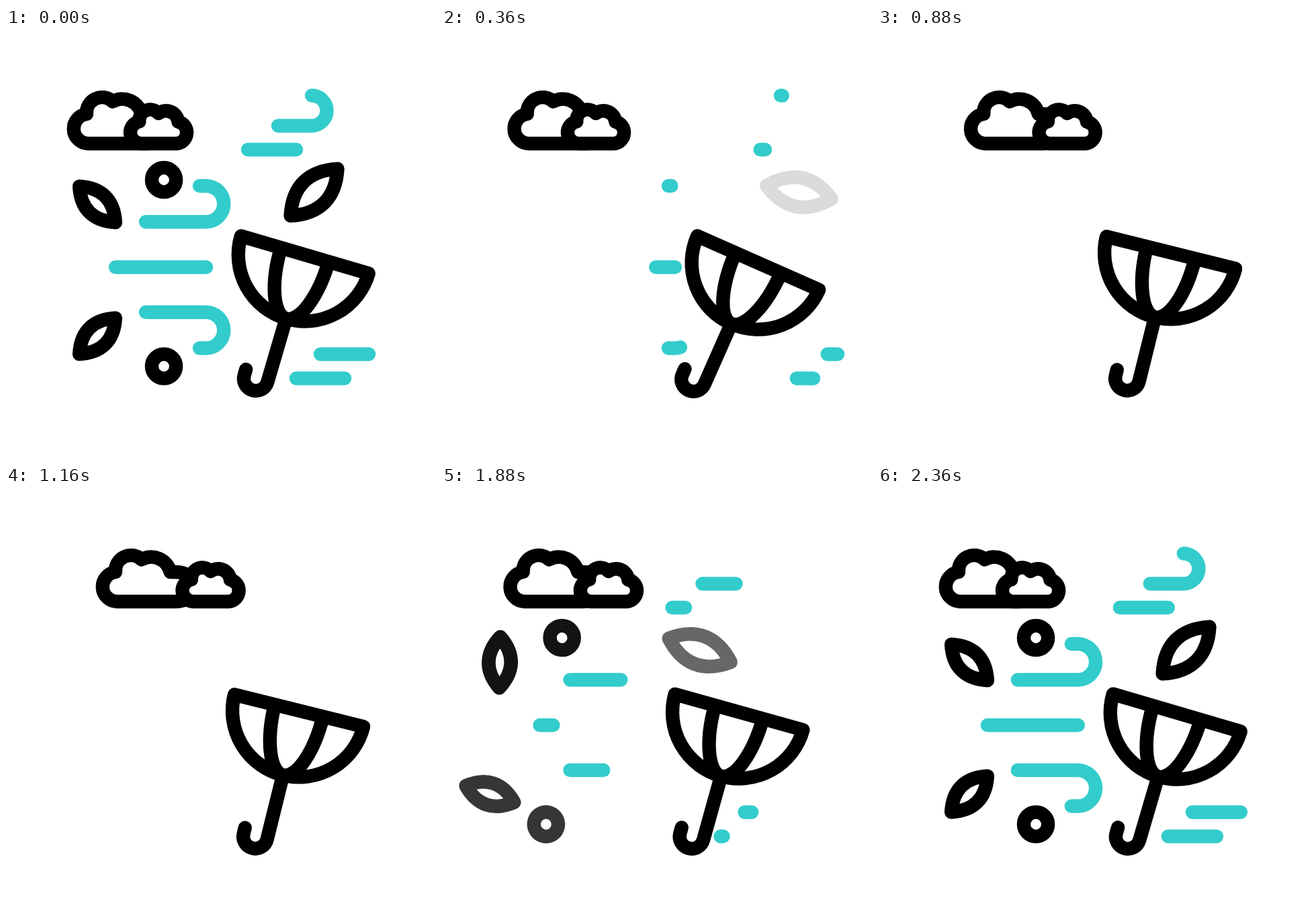
Recreate the animation shown at these times as an HTML page with a canvas. Size 640 by 640 pixels, loop 2.4 s.

```html
<!DOCTYPE html>
<html lang="en">
<head>
<meta charset="utf-8">
<title>Windy weather</title>
<style>
  html, body { margin: 0; width: 100%; height: 100%; overflow: hidden; background: #fff; }
  canvas { display: block; width: 640px; height: 640px; }
</style>
</head>
<body>
<canvas id="stage" width="640" height="640"></canvas>
<script>
const ctx = document.getElementById('stage').getContext('2d');
const LOOP = 2400, INK = '#000', TEAL = '#33cccc', DEG = Math.PI / 180;

const bigCloud = new Path2D('M122 172A22.1 22.1 0 0 1 120 128A23 23 0 0 1 158.8 109.5' +
  'A29 29 0 0 1 201.5 128H209A30 22 0 0 1 209 172Z');
const smallCloud = new Path2D('M200.5 172A16.5 16.5 0 0 1 198 139.3A16.3 16.3 0 0 1 226.5 127' +
  'A18.5 18.5 0 0 1 256 139.5A16.5 16.5 0 0 1 253.5 172Z');
const umbrella = new Path2D('M-99 0H99A99 99 0 0 1 -99 0Z' +
  'M37 0A37 99 0 0 1 -37 0M0 99V197.5A18 18 0 0 1 -36 197.5V188.5');

const leafPath = s => new Path2D(
  `M${-38 * s} 0C${-13 * s} ${-22.4 * s} ${13 * s} ${-22.4 * s} ${38 * s} 0` +
  `C${13 * s} ${22.4 * s} ${-13 * s} ${22.4 * s} ${-38 * s} 0Z`);
const ring = new Path2D();
ring.arc(0, 0, 18.1, 0, 7);

const gust = (d, length, order) => ({ path: new Path2D(d), length, order });
const gusts = [
  gust('M208 288.5H297.5A26.75 26.75 0 0 0 297.5 235H288', 183, 0),
  gust('M405 145.5H455A22.5 22.5 0 0 0 455 100.5', 120.7, 0),
  gust('M208 423H297.5A26.75 26.75 0 0 1 297.5 476.5H288', 183, 1),
  gust('M360 181H432', 72, 1),
  gust('M163 356H298', 135, 2),
  gust('M468 485.5H540', 72, 2),
  gust('M432 521.5H504', 72, 3)
];

const small = leafPath(1), large = leafPath(1.3);
const floaters = [
  { path: small, x: 136, y: 262.5, angle: 45, reach: 97.5, order: 0 },
  { path: ring, x: 235, y: 226, angle: 0, reach: 110, order: 0 },
  { path: small, x: 136, y: 458.5, angle: -45, reach: 91, order: 1 },
  { path: ring, x: 235, y: 503.5, angle: 0, reach: 113, order: 1 },
  { path: large, x: 458.5, y: 244.5, angle: -45, reach: 102, order: 2 }
];
// Timing by order: glide in, fade in, fade out.
const glideIn = [1586, 1667, 1678], fadeIn = [1640, 1677, 1717], fadeOut = [0, 55, 136];

function ease(t, start, duration) {
  const u = Math.min(1, Math.max(0, (t - start) / duration));
  return u * u * (3 - 2 * u);
}

// Eased value through [time, value] keys.
function track(t, keys) {
  let value = keys[0][1];
  for (let i = 1; i < keys.length; i++) {
    const [t0, v0] = keys[i - 1], [t1, v1] = keys[i];
    if (t >= t0) value = v0 + (v1 - v0) * ease(t, t0, t1 - t0);
  }
  return value;
}

function placed(x, y, degrees, draw) {
  ctx.save();
  ctx.translate(x, y);
  ctx.rotate(degrees * DEG);
  draw();
  ctx.restore();
}

function drawCloud(path, x) {
  placed(x, 0, 0, () => {
    ctx.fillStyle = '#fff';
    ctx.fill(path);
    ctx.stroke(path);
  });
}

function drawGust({ path, length, order }, t) {
  const entering = t > 1200;
  const from = entering ? 0 : ease(t, 40 * order, 400);
  const to = entering ? ease(t, 1704 + 40 * order, 400) : 1;
  if (to - from < 0.0005) return;
  const shift = entering
    ? track(t, [[1700, -21], [2400, 0]])
    : track(t, [[0, 0], [520, 63]]);
  placed(shift, 0, 0, () => {
    ctx.strokeStyle = TEAL;
    if (to - from < 1) {
      ctx.setLineDash([length * (to - from), 5000]);
      ctx.lineDashOffset = -length * from;
    }
    ctx.stroke(path);
  });
}

function drawFloater({ path, x, y, angle, reach, order }, t) {
  const entering = t > 1200;
  const alpha = entering ? ease(t, fadeIn[order], 290) : 1 - ease(t, fadeOut[order], 295);
  if (alpha <= 0) return;
  const away = entering ? 1 - ease(t, glideIn[order], 600) : ease(t, 40 * order, 480);
  const dx = entering ? -reach * away : reach * 1.14 * away;
  placed(x + dx, y, angle + 90 * away, () => {
    ctx.globalAlpha = alpha;
    ctx.stroke(path);
  });
}

function drawUmbrella(t) {
  const sway = track(t, [[0, 0], [640, 12.6], [1000, -7.6], [1360, 4.6], [1680, -1.9], [2040, 0]]);
  placed(365.5, 540.5, 16.35 + sway, () => {
    ctx.translate(18.9, -217.1);
    ctx.stroke(umbrella);
  });
}

function render(t) {
  ctx.fillStyle = '#fff';
  ctx.fillRect(0, 0, 640, 640);
  ctx.lineWidth = 20.4;
  ctx.lineCap = ctx.lineJoin = 'round';
  ctx.strokeStyle = INK;
  drawCloud(bigCloud, track(t, [[110, 0], [1110, 43], [1290, 43], [1930, 0]]));
  drawCloud(smallCloud, 0.4 + track(t, [[270, 0], [1240, 79], [1500, 79], [2075, 0]]));
  gusts.forEach(g => drawGust(g, t));
  floaters.forEach(f => drawFloater(f, t));
  drawUmbrella(t);
}

const begin = performance.now();
function tick() {
  render((performance.now() - begin) % LOOP);
  requestAnimationFrame(tick);
}
tick();
</script>
</body>
</html>
```
